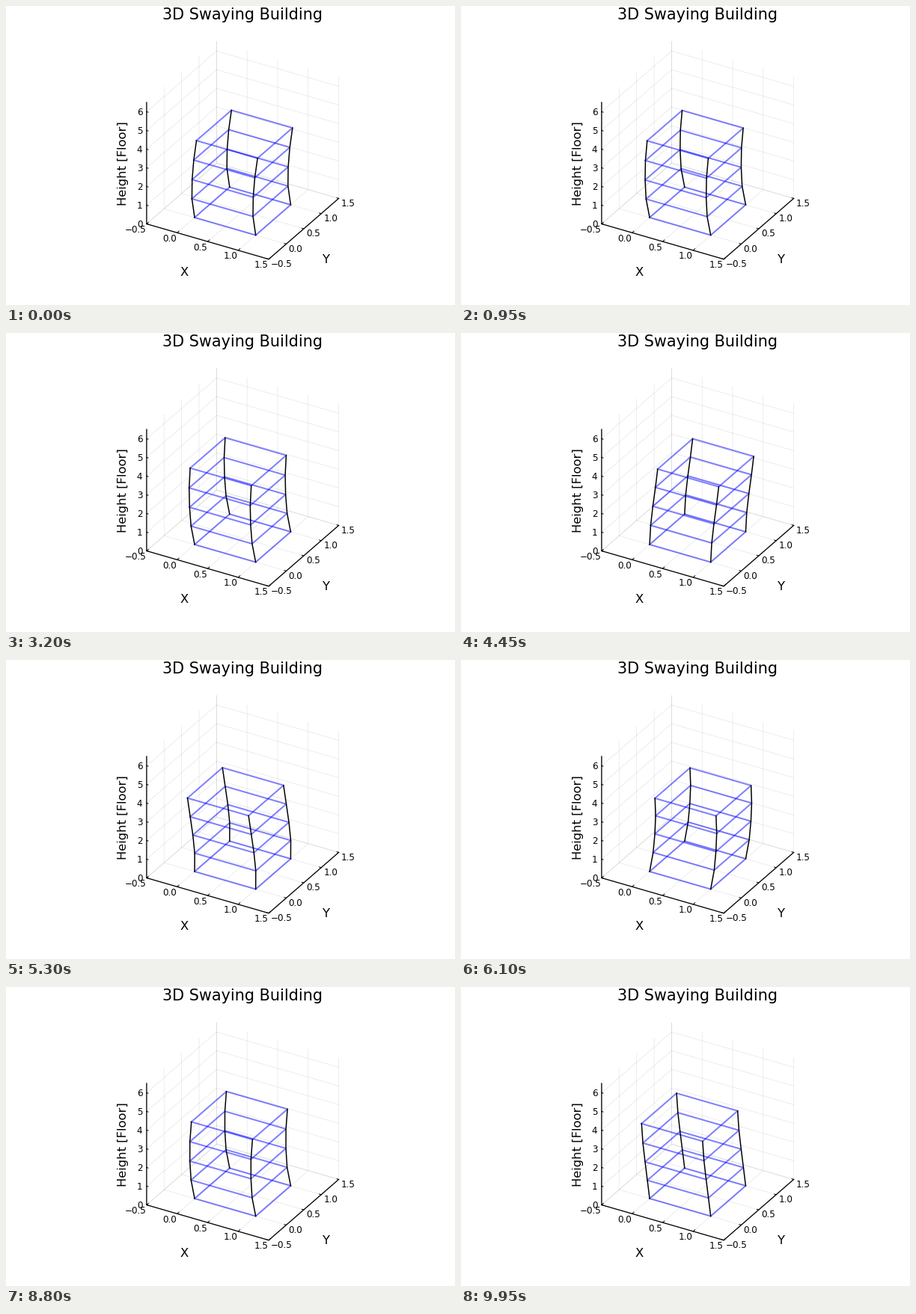
Animation, 600 px wide and 400 px high, one loop 10 s. Source, as a matplotlib script:

```python
import numpy as np
import matplotlib.pyplot as plt
from matplotlib.animation import FuncAnimation

W, H, DPI = 600, 400, 100
FRAMES, INTERVAL = 200, 50
PX = 72 / DPI                      # points per pixel

LOW, HIGH, ROOF = -0.5, 1.5, 6.5   # limits of x and y, top of z
ORIGIN = np.array([187.9, 291.5])  # screen place of (LOW, LOW, 0)
AXES = np.array([[81.6, 23.6], [46.75, -40.65], [0, -25]])
CORNERS = [(0, 0), (1, 0), (1, 1), (0, 1)]
FLOORS = 5
STEP = 1.6815                      # phase advance per frame

plt.rcParams["font.family"] = "DejaVu Sans"
fig = plt.figure(figsize=(W / DPI, H / DPI), dpi=DPI, facecolor="white")
ax = fig.add_axes([0, 0, 1, 1])
ax.set(xlim=(0, W), ylim=(H, 0))
ax.axis("off")


def project(points):
    return ORIGIN + (np.asarray(points, float) - [LOW, LOW, 0]) @ AXES


def path(points, width, **style):
    x, y = project(points).T
    return ax.plot(x, y, lw=width * PX, **style)[0]


def label(x, y, text, size, ha="center", **style):
    ax.text(x, y, text, fontsize=size * PX, ha=ha, va="baseline", **style)


def draw_grid():
    style = dict(color="black", alpha=0.1, zorder=1)
    for v in np.arange(LOW, HIGH + 0.1, 0.5):
        path([(v, LOW, 0), (v, HIGH, 0), (v, HIGH, ROOF)], 0.7, **style)
        path([(HIGH, v, 0), (LOW, v, 0), (LOW, v, ROOF)], 0.7, **style)
    for z in range(7):
        path([(LOW, LOW, z), (LOW, HIGH, z), (HIGH, HIGH, z)], 0.7, **style)


def draw_axes():
    style = dict(color="black", zorder=2)
    path([(LOW, LOW, ROOF), (LOW, LOW, 0), (HIGH, LOW, 0), (HIGH, HIGH, 0)],
         1.3, **style)
    for v in np.arange(LOW, HIGH + 0.1, 0.5):
        text = f"{v:.1f}".replace("-", "\u2212")
        path([(v, LOW, 0), (v, LOW + 0.05, 0)], 1, **style)
        x, y = project((v, LOW, 0))
        label(x - 0.5, y + 11.5, text, 12, "right")
        path([(HIGH, v, 0), (HIGH - 0.03, v, 0)], 1, **style)
        x, y = project((HIGH, v, 0))
        label(x + 3, y + 10.4, text, 12, "left")
    for z in range(7):
        path([(LOW, LOW, z), (LOW + 0.025, LOW, z)], 1, **style)
        x, y = project((LOW, LOW, z))
        label(x - 5.6, y + 4.6, str(z), 12, "right")


def draw_titles():
    label(316.3, 18.4, "3D Swaying Building", 20.8)
    label(238.5, 360.6, "X", 16.4)
    label(428, 343.6, "Y", 16.4)
    ax.text(161, 210.5, "Height [Floor]", fontsize=16.4 * PX, rotation=90,
            ha="right", va="center", rotation_mode="default",
            bbox=None).set(ha="center", va="baseline",
                           rotation_mode="anchor")


def sway(level, frame):
    """Sideways shift of a floor; the ground floor stays put."""
    if level == 0:
        return 0, 0
    i = level + 1
    phase = -1.58 - STEP * frame
    return (0.0204 * i * np.sin(phase + 0.3 * i),
            0.0168 * i * np.sin(phase + 0.5 * i))


draw_grid()
draw_axes()
draw_titles()
slabs = [ax.plot([], [], color="blue", alpha=0.5, lw=2 * PX, zorder=3)[0]
         for _ in range(FLOORS)]
columns = [ax.plot([], [], color="black", lw=1.5 * PX, zorder=4)[0]
           for _ in CORNERS]


def update(frame):
    shifts = [sway(level, frame) for level in range(FLOORS)]
    nodes = np.array([[project((cx + dx, cy + dy, level)) for cx, cy in CORNERS]
                      for level, (dx, dy) in enumerate(shifts)])
    for slab, ring in zip(slabs, nodes):
        slab.set_data(*ring[[0, 1, 2, 3, 0]].T)
    for k, column in enumerate(columns):
        column.set_data(*nodes[:, k].T)
    return slabs + columns


anim = FuncAnimation(fig, update, frames=FRAMES, interval=INTERVAL,
                     init_func=lambda: update(0), repeat=True, repeat_delay=0)
plt.show()
```
